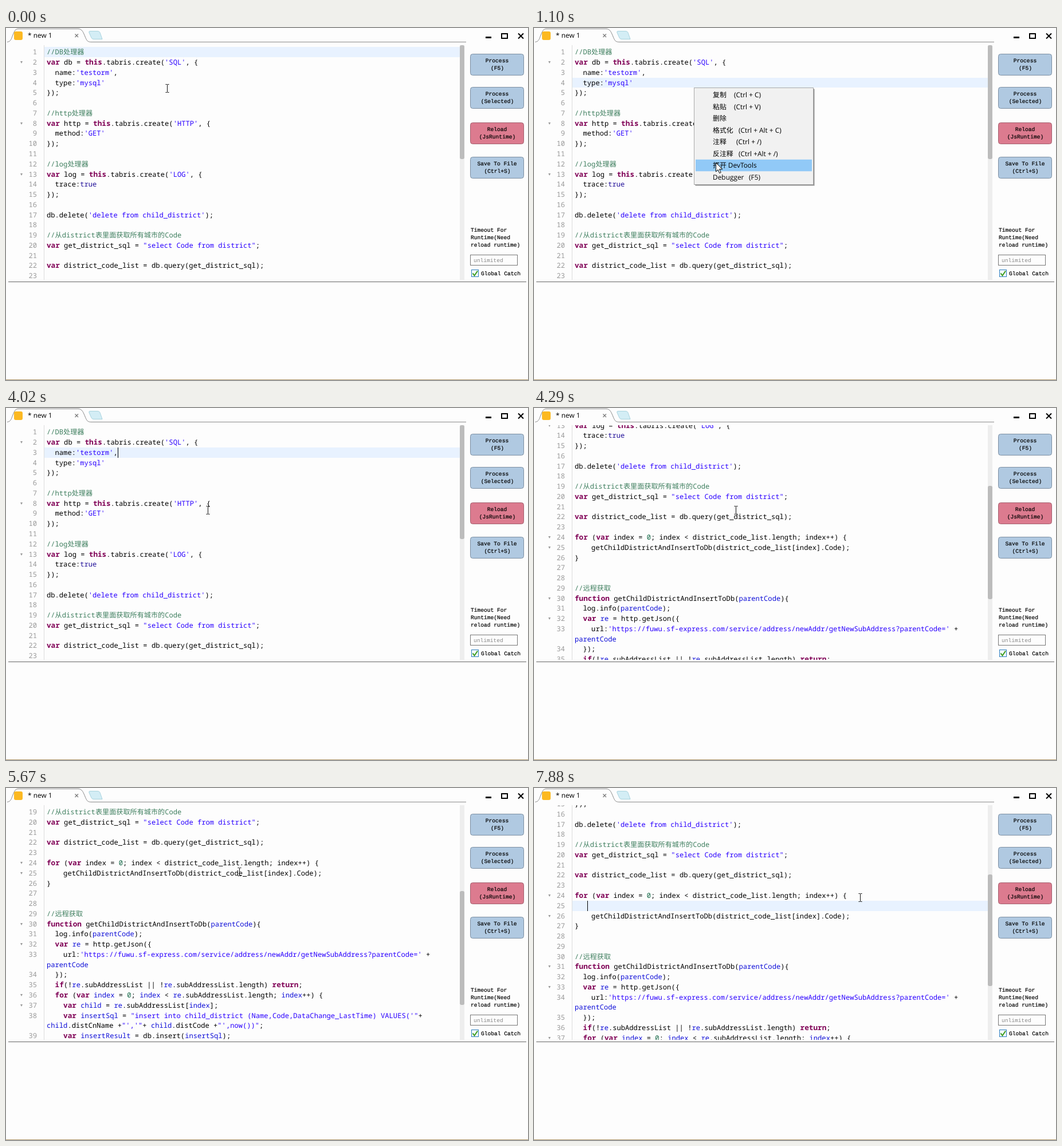
An HTML page that plays this animation: 911 by 615 pixels, repeating every 8000 ms.

```html
<!DOCTYPE html>
<html lang="zh-CN">
<head>
<meta charset="utf-8">
<title>Script editor</title>
<style>
  html, body { margin: 0; width: 100%; height: 100%; overflow: hidden; background: #fdfdfd; }
  body { position: relative; text-rendering: geometricPrecision; }
  svg { position: absolute; left: 0; top: 0; }
  #editor { position: absolute; left: 0; top: 30px; width: 800px; height: 410px; overflow: hidden; }
  #gutter { position: absolute; left: 66px; top: 0; width: 1px; height: 100%; background: #ddd; }
  #track { position: absolute; left: 792px; top: 0; width: 8px; height: 100%; background: #eee; }
  #thumb { position: absolute; width: 8px; border-radius: 3px; background: #bcbcbc; }
  #doc { position: absolute; left: 0; top: 3.3px; width: 792px; }
  #active { position: absolute; left: 67px; width: 725px; height: 17.77px; background: #e8f2ff; }
  #caret { position: absolute; width: 1px; height: 18px; background: #000; }
  .row { position: absolute; left: 71px; white-space: pre; color: #000;
    font: 12.14px/17.77px "Noto Sans Mono", "Noto Sans CJK SC", "Noto Sans CJK", monospace; }
  .num { position: absolute; left: -71px; width: 54px; text-align: right; color: #999; }
  .fold { position: absolute; left: -46.5px; top: 7px; border: 2.5px solid transparent; border-top: 4px solid #999; }
  .key { color: #7f0055; font-weight: bold; font-size: 12.7px; line-height: 0; }
  .com { color: #3f7f5f; }
  .str { color: #2a00ff; }
  .atom { color: #219; }
  .lit { color: #164; }
  .loc { color: #1010d8; }
  .side { font: 9.6px "Liberation Mono", monospace; fill: #000; stroke: #000; stroke-width: .2px; }
  .mid { text-anchor: middle; }
  .ui { font: 11.9px "Open Sans", "Noto Sans CJK SC", "Noto Sans CJK", sans-serif; fill: #000; }
</style>
</head>
<body>
<svg width="911" height="615">
  <path d="M2 24.5C9 23.5 9 19 12 12S16 1.5 22 1.5H126C133 1.5 135 8 138 15S142 24.5 149 24.5H803" fill="none" stroke="#8a8a8a"/>
  <path d="M147 5.5H160Q163 5.5 164 8L168 19.5H153Q150 19.5 149 17L145 8Q144 5.5 147 5.5Z" fill="#d3edf5" stroke="#a9d3de"/>
  <rect x="14" y="6" width="15" height="15" rx="3" fill="#fcb922"/>
  <text class="ui" x="38" y="17">* new 1</text>
  <path d="M120.5 10.5l5.5 5.5m0-5.5l-5.5 5.5" stroke="#777" stroke-width="1.2"/>
  <g fill="none" stroke="#000" stroke-width="2">
    <path d="M837 16.5H847" stroke-width="3"/>
    <rect x="865" y="10" width="10" height="8"/>
    <path d="M894 9.5l9 9m0-9l-9 9"/>
  </g>
  <path d="M4 443.5H908" stroke="#666"/>
  <path d="M0 614.5H911" stroke="#b39a6c"/>
  <g id="buttons"></g>
  <g class="side">
    <text x="811" y="356">Timeout For</text>
    <text x="811" y="369">Runtime(Need</text>
    <text x="811" y="382">reload runtime)</text>
    <text x="816" y="409" fill="#888" stroke="none">unlimited</text>
    <text x="829" y="432">Global Catch</text>
  </g>
  <rect x="810.5" y="396.5" width="82" height="18" fill="none" stroke="#777"/>
  <rect x="812.5" y="422.5" width="12" height="12" fill="#f2f8fd" stroke="#2b7dbd"/>
  <path d="M814.5 428.5l3 4 5.5-8" fill="none" stroke="#3c9d1e" stroke-width="2"/>
</svg>

<div id="editor">
  <div id="doc"><div id="active"></div></div>
  <div id="gutter"></div>
  <div id="track"><div id="thumb"></div></div>
</div>

<svg width="911" height="615">
  <g id="menu">
    <rect x="282" y="107" width="208" height="169" opacity=".18"/>
    <rect x="281" y="106" width="208" height="169" fill="#555" opacity=".6"/>
    <rect x="279.5" y="104.5" width="208" height="169" fill="#f1f1f1" stroke="#aaa"/>
    <rect id="hover" x="282" width="203" height="20.5" fill="#91c9f7"/>
  </g>
  <path id="arrow" d="M.5.5V16l3.600-3.400 2.600 6 2.500-1.100-2.600-5.800H12Z" fill="#fff" stroke="#000"/>
  <path id="beam" d="M-3-6.500H-1Q0-6.500 0-5.500Q0-6.500 1-6.500H3M0-5.500V6.500M-3 7.500H-1Q0 7.500 0 6.500Q0 7.500 1 7.500H3" fill="none" stroke="#111"/>
</svg>

<script>
const LOOP = 8000, TICK = 138, BLINK = 530;
const PITCH = 17.77, CHAR = 7.284, VIEW = 410, MENU_TOP = 106.5, MENU_PITCH = 20.55;
const $ = id => document.getElementById(id);

// "^" marks a foldable line, "~" a wrapped continuation.
const source = `//DB处理器
^var db = this.tabris.create('SQL', {
  name:'testorm',
  type:'mysql'
});

//http处理器
^var http = this.tabris.create('HTTP', {
  method:'GET'
});

//log处理器
^var log = this.tabris.create('LOG', {
  trace:true
});

db.delete('delete from child_district');

//从district表里面获取所有城市的Code
var get_district_sql = "select Code from district";

var district_code_list = db.query(get_district_sql);

^for (var index = 0; index < district_code_list.length; index++) {
^    getChildDistrictAndInsertToDb(district_code_list[index].Code);
}


//远程获取
^function getChildDistrictAndInsertToDb(parentCode){
  log.info(parentCode);
^  var re = http.getJson({
    url:'https://fuwu.sf-express.com/service/address/newAddr/getNewSubAddress?parentCode=' +
~parentCode
  });
  if(!re.subAddressList || !re.subAddressList.length) return;
^  for (var index = 0; index < re.subAddressList.length; index++) {
^    var child = re.subAddressList[index];
    var insertSql = "insert into child_district (Name,Code,DataChange_LastTime) VALUES('"+
~child.distCnName +"','"+ child.distCode +"',now())";
    var insertResult = db.insert(insertSql);
^    if(insertResult!=1){
      log.error(child.distCnName + '插入db失败!');
^    }else{
      log.info(child.distCnName + '插入db成功!');
    }
  }
}`.split('\n');

const token = /(^\/\/.*)|('[^']*'|"[^"]*")|\b(var|this|function|if|else|for|return)\b|\b(true)\b|\b(\d+)\b|\b(parentCode|re|index|child|insertSql|insertResult)\b/g;
const kinds = ['com', 'str', 'key', 'atom', 'lit', 'loc'];
const escape = s => s.replace(/&/g, '&amp;').replace(/</g, '&lt;');

function paint(text, inFunction) {
  let html = '', last = 0;
  for (const m of text.matchAll(token)) {
    const kind = kinds[m.slice(1).findIndex(Boolean)];
    if (kind === 'loc' && !inFunction) continue;
    html += escape(text.slice(last, m.index)) + `<span class="${kind}">${escape(m[0])}</span>`;
    last = m.index + m[0].length;
  }
  return html + escape(text.slice(last));
}

function layer(lines) {
  const el = document.createElement('div');
  let num = 0, inFunction = false;
  el.innerHTML = lines.map((line, i) => {
    const fold = line[0] === '^', wrap = line[0] === '~';
    const text = fold || wrap ? line.slice(1) : line;
    inFunction ||= text.startsWith('function');
    const label = wrap ? '' : `<span class="num">${++num}</span>`;
    return `<div class="row" style="top:${i * PITCH}px">${label}${fold ? '<i class="fold"></i>' : ''}${paint(text, inFunction)}</div>`;
  }).join('');
  $('doc').append(el);
  return el;
}

const before = layer(source);
const after = layer([...source.slice(0, 24), '', ...source.slice(24)]);
const caret = document.createElement('div');
caret.id = 'caret';
$('doc').append(caret);

const blue = ['#b0c9e1', '#7d8fa2'], red = ['#dc7b8f', '#a3606e'];
$('buttons').innerHTML = [
  [45, 'Process', '(F5)', blue], [103, 'Process', '(Selected)', blue],
  [165, 'Reload', '(JsRuntime)', red], [225, 'Save To File', '(Ctrl+S)', blue]
].map(([y, a, b, [fill, line]]) => `
  <rect x="810.5" y="${y + .5}" width="93" height="37" rx="4" fill="${fill}" stroke="${line}"/>
  <text class="side mid" x="857" y="${y + 15}">${a}</text>
  <text class="side mid" x="857.5" y="${y + 27.5}">${b}</text>`).join('');

$('menu').insertAdjacentHTML('beforeend', [
  ['复制', '(Ctrl + C)', 349], ['粘贴', '(Ctrl + V)', 349], ['删除'],
  ['格式化', '(Ctrl + Alt + C)', 357], ['注释', '(Ctrl + /)', 353],
  ['反注释', '(Ctrl +Alt + /)', 357], ['打开 DevTools'], ['Debugger', '(F5)', 375]
].map(([name, keys = '', x = 0], i) => {
  const y = MENU_TOP + i * MENU_PITCH + 14.5;
  return `<text class="ui" x="312" y="${y}">${name}</text><text class="ui" x="${x}" y="${y}">${keys}</text>`;
}).join(''));

// All times below count screen refreshes of TICK ms.
const MENU_OPEN = 3, MENU_CLOSE = 22, ENTER = 52;
const pointer = [
  [0, 281, 105], [3, 281, 106], [8, 317, 235], [10, 316, 259], [16, 306, 259],
  [18, 276, 248], [20, 231, 167], [22, 262, 78], [26, 345, 168], [28, 352, 178],
  [31, 352, 178], [33, 302, 229], [41, 407, 146], [45, 535, 223], [47, 569, 191]
];
const scroll = [[29, 0], [33, 450], [37, 450], [41, 320], [43, 263]];
// time, row, column of each caret move
const moves = [[-4, 0, 0], [2, 3, 14], [MENU_CLOSE, 2, 17], [47, 23, 65], [ENTER, 24, 2], [57, 24, 3]];

const latest = (list, n) => list.findLast(k => k[0] <= n);

function along(path, n) {
  const a = latest(path, n) || path[0], b = path.find(k => k[0] > n) || a;
  const p = a === b ? 0 : Math.max(0, (n - a[0]) / (b[0] - a[0]));
  return a.slice(1).map((v, i) => v + (b[i + 1] - v) * p);
}

const show = (el, on) => { el.style.display = on ? '' : 'none'; };

function draw(t) {
  const n = Math.floor((t + 30) / TICK);
  const [x, y] = along(pointer, n).map(Math.round), [top] = along(scroll, n);
  const [since, row, col] = latest(moves, n);
  const menuOpen = n >= MENU_OPEN && n < MENU_CLOSE, added = n >= ENTER;

  $('doc').style.transform = `translateY(${-top}px)`;
  show(before, !added);
  show(after, added);

  $('active').style.top = caret.style.top = row * PITCH + 'px';
  caret.style.left = Math.round(71 + col * CHAR) + 'px';
  // A click lands a little before the refresh that shows it.
  show(caret, ((n - since) * TICK + 95) % (2 * BLINK) < BLINK);

  const height = (source.length + added) * PITCH;
  const thumb = VIEW * VIEW / (height - 8);
  $('thumb').style.height = thumb + 'px';
  $('thumb').style.top = top / (height - VIEW + 7) * (VIEW - thumb) + 'px';

  const item = Math.floor((y - MENU_TOP) / MENU_PITCH);
  show($('menu'), menuOpen);
  show($('hover'), x >= 280 && item >= 0);
  $('hover').setAttribute('y', MENU_TOP + Math.max(item, 0) * MENU_PITCH);
  show($('arrow'), menuOpen);
  show($('beam'), !menuOpen);
  $('arrow').setAttribute('transform', `translate(${x} ${y})`);
  $('beam').setAttribute('transform', `translate(${x + .5} ${y})`);
}

const start = performance.now();
function tick() {
  draw((performance.now() - start) % LOOP);
  requestAnimationFrame(tick);
}
draw(0);
requestAnimationFrame(tick);
</script>
</body>
</html>
```
